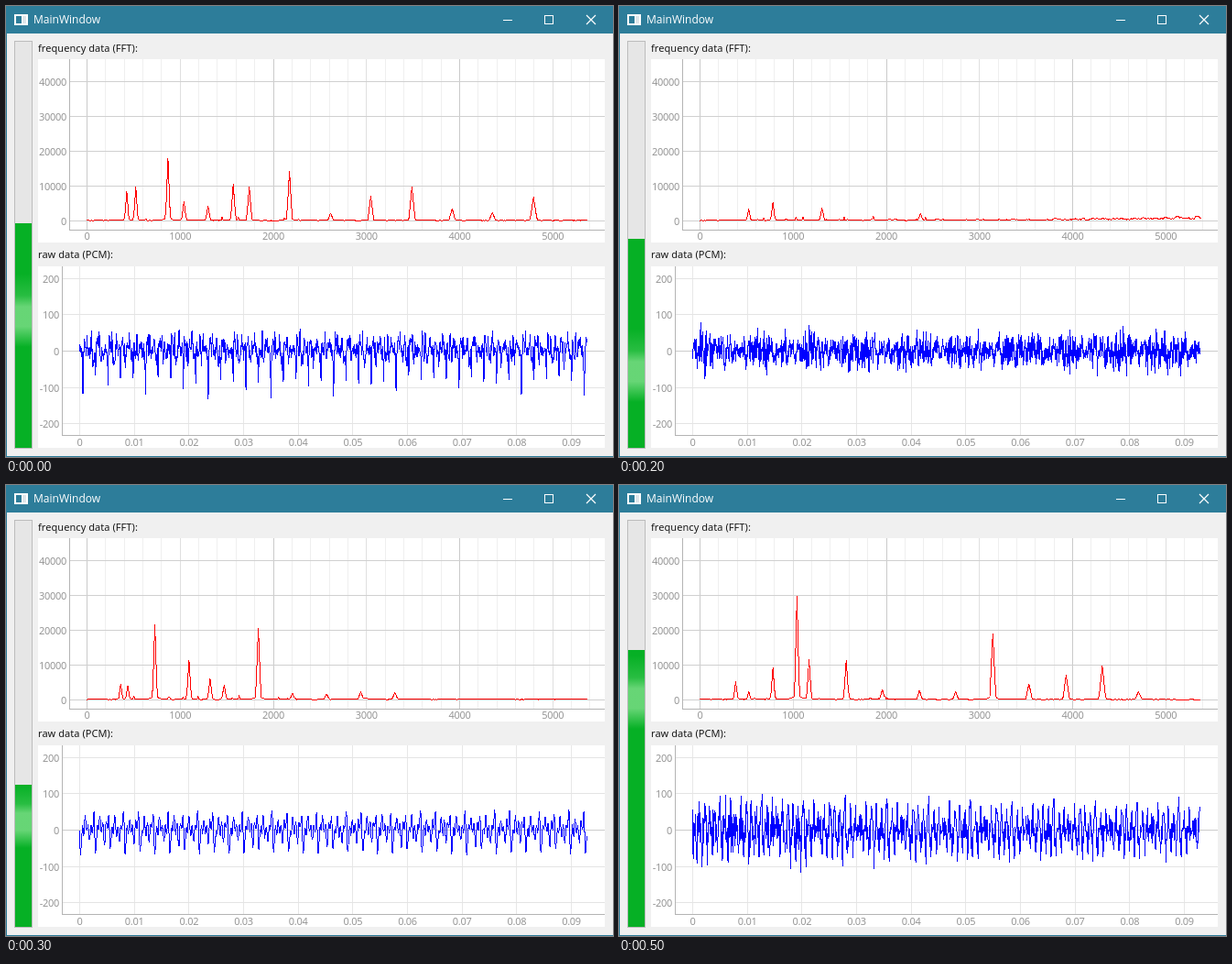
Recreate the animation shown at these times as an HTML page. Size 663x492 px, loop 600 ms.

```html
<!DOCTYPE html>
<html lang="en">
<head>
<meta charset="utf-8">
<title>MainWindow</title>
<style>
  html, body { margin: 0; width: 100%; height: 100%; overflow: hidden; background: #f0f0f0; }
  svg { display: block; }
  .crisp, .wave { shape-rendering: crispEdges; }
  .title { font: 12px "Open Sans", sans-serif; fill: #fff; }
  .label { font: 11px "Noto Sans", sans-serif; fill: #181818; letter-spacing: .06px; }
  .tick { font: 11px "Noto Sans", sans-serif; fill: #969696; letter-spacing: -.28px; }
  .wave { fill: none; stroke-width: 1; stroke-linejoin: bevel; }
</style>
</head>
<body>
<svg id="stage" width="663" height="492" viewBox="0 0 663 492">
  <defs>
    <linearGradient id="glow" x1="0" y1="0" x2="0" y2="1">
      <stop offset="0" stop-color="#78dc84" stop-opacity="0"/>
      <stop offset=".3" stop-color="#78dc84" stop-opacity=".3"/>
      <stop offset=".45" stop-color="#78dc84" stop-opacity=".85"/>
      <stop offset=".72" stop-color="#78dc84" stop-opacity=".85"/>
      <stop offset="1" stop-color="#78dc84" stop-opacity="0"/>
    </linearGradient>
    <clipPath id="track"><rect x="10" y="39" width="18" height="443"/></clipPath>
  </defs>
</svg>
<script>
const NS = 'http://www.w3.org/2000/svg';
const stage = document.getElementById('stage');
const STEP = 100;

function add(tag, attrs, parent = stage) {
  const el = document.createElementNS(NS, tag);
  for (const k in attrs) el.setAttribute(k, attrs[k]);
  return parent.appendChild(el);
}
function rect(x, y, width, height, fill, parent) {
  return add('rect', { x, y, width, height, fill, class: 'crisp' }, parent);
}
function text(str, x, y, cls, anchor = 'start') {
  add('text', { x, y, class: cls, 'text-anchor': anchor }).textContent = str;
}
const vline = (x, y1, y2, color) => rect(Math.round(x), y1, 1, y2 - y1, color);
const hline = (y, x1, x2, color) => rect(x1, Math.round(y), x2 - x1, 1, color);

function random(seed) {
  return () => {
    seed = (seed + 0x6D2B79F5) | 0;
    let n = Math.imul(seed ^ (seed >>> 15), 1 | seed);
    n = (n + Math.imul(n ^ (n >>> 7), 61 | n)) ^ n;
    return ((n ^ (n >>> 14)) >>> 0) / 4294967296;
  };
}

// Window frame
function drawWindow() {
  rect(0, 0, 663, 492, '#2d7d9a');
  rect(1, 30, 662, 461, '#f0f0f0');
  rect(9, 9, 15, 12, '#fff');
  rect(11, 11, 6, 8, '#2d7d9a');
  rect(18, 11, 4, 8, '#dfe6ea');
  text('MainWindow', 30, 19, 'title');
  rect(543, 15, 10, 1, '#fff');
  add('rect', { x: 588.5, y: 10.5, width: 9, height: 9, fill: 'none', stroke: '#fff' });
  add('path', { d: 'M634 10l10 10M644 10l-10 10', stroke: '#fff', 'stroke-width': 1.2 });
  rect(9, 38, 20, 445, '#bcbcbc');
  rect(10, 39, 18, 443, '#e6e6e6');
}

// Frequency chart
const FX = 88, FY = 234, KHZ = 101.75;
function drawFrequencyChart() {
  text('frequency data (FFT):', 35, 50, 'label');
  rect(35, 58, 619, 200, '#fff');
  for (let i = 0; i <= 27; i++) {
    const color = i % 10 === 0 ? '#cacaca' : i % 5 === 0 ? '#dfdfdf' : '#efefef';
    vline(FX + i * KHZ / 5, 58, 244, color);
  }
  for (let i = 0; i <= 4; i++) {
    hline(FY - i * 38, 69, 654, '#d0d0d0');
    text(i * 10000, 66, FY + 4.5 - i * 38, 'tick', 'end');
  }
  for (let i = 0; i <= 5; i++) text(i * 1000, FX + .5 + i * KHZ, 255, 'tick', 'middle');
  vline(69, 58, 245, '#b4b4b4');
  hline(244, 69, 654, '#b4b4b4');
}

// Sample chart
const SX = 80.5, SY = 376.5, CENTI = 59.67, UNIT = .397;
function drawSampleChart() {
  text('raw data (PCM):', 35, 275, 'label');
  rect(35, 284, 619, 198, '#fff');
  for (let i = 0; i <= 9; i++) {
    vline(SX - .5 + i * CENTI, 284, 468, '#e7e7e7');
    text(i ? '0.0' + i : '0', SX + i * CENTI, 480, 'tick', 'middle');
  }
  for (let v = -200; v <= 200; v += 100) {
    const y = SY - v * UNIT;
    hline(y - .5, 62, 654, v ? '#e4e4e4' : '#cccccc');
    text(v, 58, y + 4.5, 'tick', 'end');
  }
  vline(61, 284, 469, '#b4b4b4');
  hline(468, 61, 654, '#b4b4b4');
}

// A note: overtones of one pitch, quiet ones at random, the loud ones given
function note(pitch, count, quiet, loud, rnd) {
  return Array.from({ length: count }, (_, i) => ({
    f: pitch * (i + 1),
    h: loud[i + 1] || quiet * (.6 + .8 * rnd())
  }));
}

function spectrum(scene, peaks, rnd) {
  const bin = 1.097;
  const centres = peaks.map(p => ({ h: p.h, x: FX + Math.round(p.f / 1000 * KHZ / bin) * bin }));
  let d = '', drift = 0;
  for (let i = 0; i < 500; i++) {
    const x = FX + i * bin;
    drift = drift * .5 + rnd() * .5;
    let h = drift * scene.floor(i / 500);
    if (i > 12 && i < 230 && rnd() > .95) h += 4 * rnd();
    for (const p of centres) {
      const dist = Math.abs(x - p.x), w = 2.4 + i / 270;
      h = Math.max(h, p.h * Math.max(0, 1 - dist / w), p.h * .045 / (1 + dist * dist / 30));
    }
    d += (i ? 'L' : 'M') + x.toFixed(1) + ' ' + (FY + .5 - h).toFixed(1);
  }
  return d;
}

// The same overtones, nearly in phase at the first dip, plus hiss
function samples(scene, peaks, rnd) {
  const count = 2048, rate = 22050;
  const parts = peaks.map(p => ({ w: 2 * Math.PI * p.f, h: p.h, phase: (rnd() - .5) * scene.spread }));
  const total = parts.reduce((sum, p) => sum + p.h, 0);
  let d = '';
  for (let i = 0; i < count; i++) {
    const t = i / rate, u = i / count;
    let v = 0;
    for (const p of parts) v -= p.h * Math.cos(p.w * (t - scene.dip) + p.phase);
    const hiss = (rnd() + rnd() + rnd() - 1.5) * 2;
    v = v / total * scene.gain * (1 - scene.fade * u) + hiss * scene.hiss(u);
    d += (i ? 'L' : 'M') + (SX + t * 100 * CENTI).toFixed(2) + ' ' + (SY - v * UNIT).toFixed(1);
  }
  return d;
}

// notes: [pitch, overtones, quiet height, loud overtones]
const scenes = [
  {
    level: 237, glow: 338, dip: .0006, gain: 125, spread: 1.3, fade: 0,
    floor: u => 1.4, hiss: u => 9,
    notes: [
      [436, 11, 14, { 1: 32, 2: 68, 4: 37, 5: 54, 7: 27, 8: 37, 11: 26 }],
      [523, 3, 0, { 1: 37, 2: 21, 3: 40 }]
    ]
  },
  {
    level: 278, glow: 458, dip: .0002, gain: 112, spread: 1.9, fade: 0,
    floor: u => 1.9 - u, hiss: u => 8,
    notes: [
      [389, 13, 14, { 1: 6, 2: 97, 3: 25, 4: 46, 8: 65, 11: 31, 12: 24 }],
      [491, 2, 14, {}]
    ]
  },
  {
    level: 254, glow: 398, dip: .004, gain: 36, spread: 6, fade: 0,
    floor: u => 2 + 5 * u ** 4,
    hiss: u => 20 + 5 * Math.sin(u * 62) + 4 * Math.sin(u * 113),
    notes: [[264, 9, 2, { 2: 13, 3: 20, 5: 14, 9: 8 }]]
  },
  {
    level: 327, glow: 362, dip: .0001, gain: 86, spread: 2.4, fade: 0,
    floor: u => 1.7, hiss: u => 2.5,
    notes: [
      [368, 9, 7, { 1: 17, 2: 82, 3: 43, 4: 16, 5: 78 }],
      [442, 3, 5, { 1: 15, 3: 23 }]
    ]
  },
  {
    level: 413, dip: .0053, gain: 29, spread: 1.8, fade: .6,
    floor: u => 2 - 1.4 * u, hiss: u => u > .76 ? 7.5 : 2.6,
    notes: [[249, 8, 5, { 2: 31, 4: 9, 5: 10 }]]
  },
  {
    level: 180, glow: 232, dip: .0054, gain: 160, spread: 4, fade: .15,
    floor: u => 2 - u, hiss: u => 5 + 18 * Math.max(0, 1 - u * 2.5),
    notes: [
      [393, 12, 13, { 1: 20, 2: 35, 3: 44, 4: 43, 8: 72, 10: 27, 11: 37 }],
      [524, 2, 9, { 2: 113 }]
    ]
  }
];

function drawScene(scene, index) {
  const rnd = random(index * 13 + 3);
  const peaks = scene.notes.flatMap(n => note(...n, rnd));
  const g = add('g', { opacity: 0 });
  rect(10, scene.level, 18, 482 - scene.level, '#06b025', g);
  if (scene.glow) {
    const top = Math.max(scene.level, scene.glow - 46);
    add('rect', { x: 10, y: top, width: 18, height: scene.glow + 34 - top,
      fill: 'url(#glow)', 'clip-path': 'url(#track)' }, g);
  }
  add('path', { d: spectrum(scene, peaks, rnd), class: 'wave', stroke: '#f00' }, g);
  add('path', { d: samples(scene, peaks, rnd), class: 'wave', stroke: '#00f' }, g);

  const n = scenes.length, keys = [];
  for (let i = 0; i <= n; i++) {
    keys.push({ opacity: i % n === index ? 1 : 0, offset: i / n, easing: 'step-end' });
  }
  g.animate(keys, { duration: n * STEP, iterations: Infinity });
}

drawWindow();
drawFrequencyChart();
drawSampleChart();
scenes.forEach(drawScene);
</script>
</body>
</html>
```
